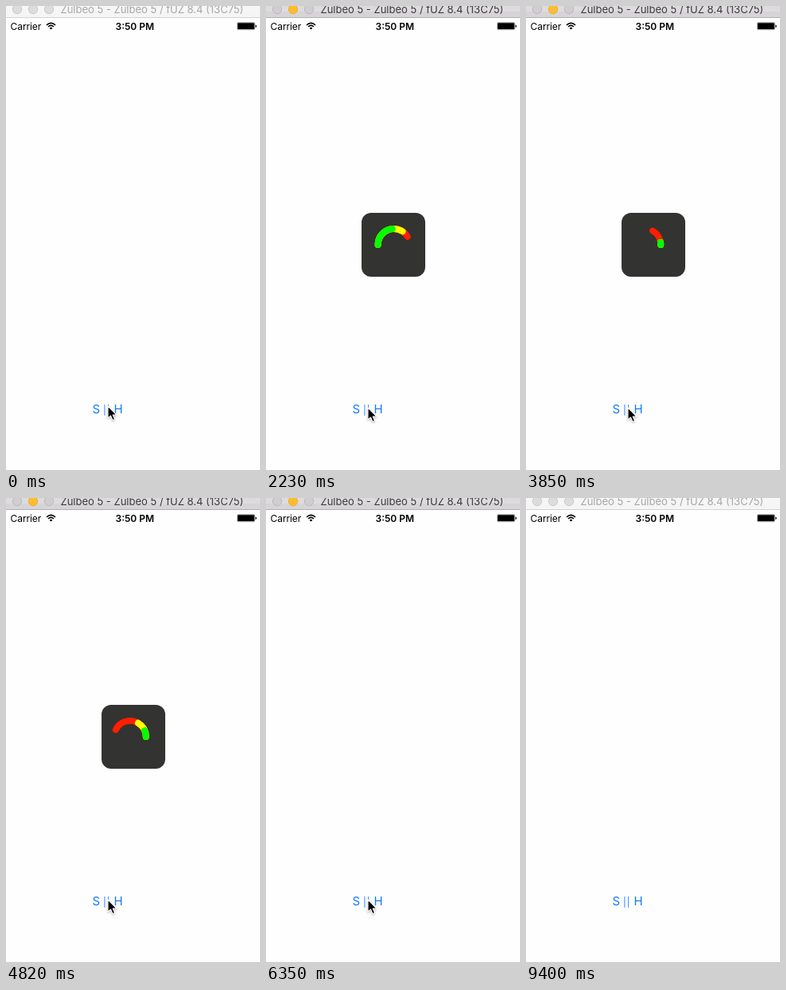
Write an HTML page that moves like this. It is 319 by 581 pixels and loops after 9.48 s.

```html
<!DOCTYPE html>
<html lang="en">
<head>
<meta charset="utf-8">
<title>Worm loader</title>
<style>
  html, body { margin: 0; width: 100%; height: 100%; overflow: hidden; background: #fefefe; }
  svg { display: block; }
  text { font-family: Inter, "Liberation Sans", sans-serif; white-space: pre; }
  #bar { --top: #f6f6f6; --base: #f6f6f6; --line: #d2d2d2; --ink: #a6a6a6; --dot: #dcdcdc; --rim: #cbcbcb; --mid: #dcdcdc; --midRim: #cbcbcb; }
  #bar.active { --top: #dedbde; --base: #d3d0d3; --line: #b3b0b3; --ink: #3a3a3a; --dot: #d0cdd0; --rim: #bcb9bc; --mid: #fdbd2e; --midRim: #f0ae2e; }
  #bar circle { fill: var(--dot); stroke: var(--rim); }
  #bar .mid { fill: var(--mid); stroke: var(--midRim); }
  #worm path { fill: none; stroke-width: 8; stroke-linecap: round; }
</style>
</head>
<body>
<svg width="319" height="581" viewBox="0 0 319 581">
  <g id="bar">
    <rect width="319" height="14" style="fill: var(--top)"/>
    <rect y="7" width="319" height="7" style="fill: var(--base)" opacity=".6"/>
    <rect y="14" width="319" height="1" style="fill: var(--line)"/>
    <circle cx="14" cy="4" r="5.7"/>
    <circle cx="34" cy="4" r="5.7" class="mid"/>
    <circle cx="54" cy="4" r="5.7"/>
    <text x="68.5" y="9.4" font-size="13" style="fill: var(--ink)">Zulbeo 5 - Zulbeo 5 / fUZ 8.4 (13C75)</text>
  </g>

  <g id="status">
    <text x="5.6" y="29.5" font-size="12" letter-spacing="-.1">Carrier</text>
    <g fill="none" stroke="#000" stroke-width="1.6">
      <path d="M51 23.8Q56.5 18.8 62 23.8M53 26Q56.5 22.8 60 26"/>
      <path d="M56.5 29.6L54.6 27.5Q56.5 25.9 58.4 27.5Z" fill="#000" stroke="none"/>
    </g>
    <text x="161.8" y="29.5" font-size="12" font-weight="600" text-anchor="middle">3:50 PM</text>
    <rect x="290.4" y="20.7" width="22" height="9" rx="1.2" fill="none" stroke="#888" stroke-width=".8"/>
    <rect x="291" y="21.3" width="20.8" height="7.8" rx=".6"/>
    <path d="M313.3 23.6q1.4 0 1.4 1.7t-1.4 1.7z"/>
  </g>

  <text id="button" x="108.4" y="509.6" font-size="15" letter-spacing="-.15" fill="#117aff">S <tspan font-size="11.5" letter-spacing=".9">||</tspan> H</text>

  <g id="hud">
    <rect x="-40" y="-40" width="80" height="80" rx="12" fill="#333331"/>
    <g id="worm">
      <path d="M0 0A20 20 0 0 1 40 0" pathLength="1" stroke="#ff1e00"/>
      <path d="M0 0A20 20 0 0 1 40 0" pathLength="1" stroke="#ffff00"/>
      <path d="M0 0A20 20 0 0 1 40 0" pathLength="1" stroke="#00ff00"/>
    </g>
  </g>

  <path id="cursor" d="M0 0V15.2L3.5 12L6 17.6L8.6 16.5L6.2 11H11Z" fill="#000" stroke="#fff" stroke-width="1.1" stroke-linejoin="round" style="filter: drop-shadow(0 1px 1px rgba(0,0,0,.3))"/>
</svg>

<script>
const LOOP = 9480, CYCLE = 1200;
const SHOW = 1600, HIDE = 5850, GONE = 6340;    // loader
const TAP_SHOW = 1620, TAP_HIDE = 5730;         // button presses
const LEAVE = 7790, LEFT = 8210;                // cursor exit
const LANDED = .56, LIFT = .63, STUB = .05;     // worm: head down, tail up, shortest length

const $ = id => document.getElementById(id);
const bar = $('bar'), button = $('button'), hud = $('hud'), worm = $('worm'), cursor = $('cursor');
const rings = [...worm.children];

const ramp = (t, a, b) => Math.min(1, Math.max(0, (t - a) / (b - a)));
const smooth = u => u * u * (3 - 2 * u);
const backIn = u => u * u * (3.4 * u - 2.4);

// The head hops to the right, the tail follows, and the whole path drifts left.
// Each later colour reaches out later and pulls in sooner.
function drawWorm(p) {
  const reach = ramp(p, 0, LANDED), pull = ramp(p, LIFT, 1);
  const x = 5 - 25 * smooth(reach ** 1.5) - 15 * ramp(p, LANDED, 1);
  worm.setAttribute('transform', `translate(${x} 0)`);
  rings.forEach((ring, i) => {
    const head = Math.max(STUB, reach ** (3 * 2 ** i));
    const tail = Math.min(1 - STUB, 1 - (1 - pull) ** (1 + 6 * i));
    ring.setAttribute('stroke-dasharray', `${head - tail} 3`);
    ring.setAttribute('stroke-dashoffset', -tail);
  });
}

function drawCursor(t) {
  const out = ramp(t, LEAVE, LEFT);
  const y = 501 + (t >= 420) + (t >= 1440);
  cursor.setAttribute('transform', `translate(${128 + 120 * out} ${y + 87 * out})`);
  cursor.style.display = out < 1 ? '' : 'none';
}

// Dims at once on touch, then fades back
const pressed = (t, down) => t < down ? 1 : .2 + .8 * ramp(t, down + 60, down + 320);

function draw(t) {
  bar.classList.toggle('active', t >= TAP_SHOW && t < 9400);
  button.setAttribute('opacity', pressed(t, TAP_SHOW) * pressed(t, TAP_HIDE));
  const shown = t > SHOW && t < GONE;
  hud.style.display = shown ? '' : 'none';
  if (shown) {
    const scale = smooth(ramp(t, SHOW, SHOW + 455)) - backIn(ramp(t, HIDE, GONE));
    hud.setAttribute('transform', `translate(160 299) scale(${scale})`);
    drawWorm((t - SHOW) % CYCLE / CYCLE);
  }
  drawCursor(t);
}

const start = performance.now();
function tick() {
  draw((performance.now() - start) % LOOP);
  requestAnimationFrame(tick);
}
tick();
</script>
</body>
</html>
```
